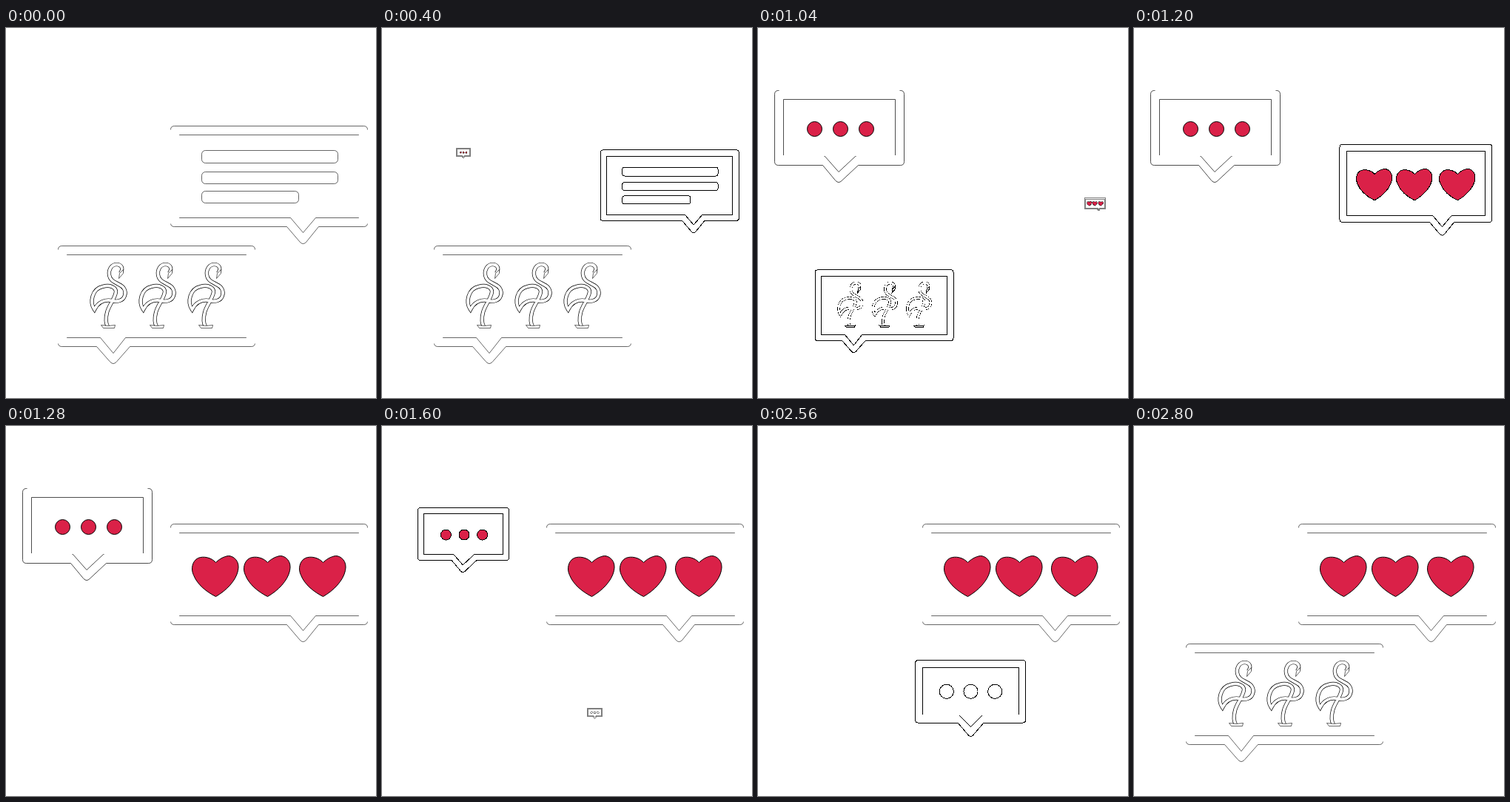
Animation, 500 px wide and 500 px high, one loop 3.2 s. Source, as an HTML page:

```html
<!DOCTYPE html>
<html lang="en">
<head>
<meta charset="utf-8">
<title>Chat bubbles</title>
<style>
  html, body { margin: 0; width: 100%; height: 100%; overflow: hidden; background: #fff; }
  svg { display: block; width: 100%; height: 100%; shape-rendering: crispEdges; }
  .still { shape-rendering: auto; }
  .line { fill: #fff; stroke: #000; vector-effect: non-scaling-stroke; }
  .red { fill: #da2148; stroke-width: 1; }
  .gap { fill: none; stroke: #fff; stroke-width: 3; }
  .tube { fill: none; stroke: #000; stroke-width: 5.2; }
  .tube.core { stroke: #fff; stroke-width: 3.8; }
</style>
</head>
<body>
<svg viewBox="0 0 500 500"><g id="stage" transform="translate(.5 .5)"></g></svg>
<script>
const TICK = 80, TICKS = 40;
const stage = document.getElementById('stage');

const path = (d, cls = 'line') => `<path class="${cls}" d="${d}"/>`;
const repeat = (offsets, art) =>
  offsets.map(x => `<g transform="translate(${x} 0)">${art}</g>`).join('');
const dots = (xs, y, r, cls) =>
  xs.map(x => `<circle class="${cls}" cx="${x}" cy="${y}" r="${r}"/>`).join('');
const bar = (y, w, h) =>
  `<rect class="line" x="264" y="${y}" width="${w}" height="${h}" rx="5"/>`;

// Speech bubble: rounded outer frame and square inner frame, both with a tail.
function frame({ l, t, r, b, tip, outer, inner, innerTip }) {
  const c = 5;
  return path(`M${l + c} ${t}H${r - c}Q${r} ${t} ${r} ${t + c}V${b - c}Q${r} ${b} ${r - c} ${b}
    H${outer[1]}L${tip + 4} ${b + 21}Q${tip} ${b + 25} ${tip - 4} ${b + 21}L${outer[0]} ${b}
    H${l + c}Q${l} ${b} ${l} ${b - c}V${t + c}Q${l} ${t} ${l + c} ${t}Z`) +
    path(`M${l + 12} ${t + 12}H${r - 12}V${b - 12}H${inner[1]}L${tip} ${innerTip}
    L${inner[0]} ${b - 12}H${l + 12}Z`);
}

// Frame edges that vanish while a bubble rests at full size.
const outerTop = ({ l, t, r }) => `M${l + 6} ${t}H${r - 6}`;
const innerBase = ({ l, r, b, inner }) =>
  `M${l + 10} ${b - 12}H${inner[0] - 1}M${inner[1] + 1} ${b - 12}H${r - 10}`;
const allSides = ({ l, t, r, b }) =>
  `M${l} ${t + 5}V${b - 4}M${r} ${t + 5}V${b - 4}` +
  `M${l + 12} ${t + 12.5}V${b - 12.5}M${r - 12} ${t + 12.5}V${b - 12.5}`;

const heart = path(`M283 184C277 177 266 175 259 178C251 182 249 193 253 201
  C258 214 271 224 283 230C297 222 310 209 313 195C316 182 307 175 300 175
  C293 176 287 180 283 184Z`, 'line red');

const bird = `M154 331C159 324 155 319 149 319C142 319 138 326 139 333
  C140 341 147 343 152 346C159 349 162 355 160 361C158 368 150 370 143 368
  C133 366 124 370 119 380C112 370 116 352 130 349C140 346 148 350 148 356
  C147 365 138 375 136 384C134 392 134 398 137 403`;
const flamingo = path(bird, 'tube') + path(bird, 'tube core') +
  path('M153 331L158 326L158 331L152 338Z') +
  path('M128 401Q138 403 147 401L146 405H131Z');

const wide = { l: 222, t: 132, r: 488, b: 268, tip: 401, outer: [379, 422], inner: [384, 418], innerTip: 276 };
const low = { l: 70, t: 294, r: 336, b: 430, tip: 144.5, outer: [122, 167], inner: [127, 161], innerTip: 439 };
const small = { l: 22, t: 84, r: 197, b: 185, tip: 108.5, outer: [87, 135], inner: [90, 131], innerTip: 194 };
const pale = { l: 193, t: 297, r: 380, b: 403, tip: 287, outer: [265, 309], inner: [268, 306], innerTip: 410 };

// start and life are in ticks; from and to are the scales at the first tick in and out.
const bubbles = [
  { box: wide, origin: [467, 241], start: 0, life: 5, from: 1, to: .703, weight: .6,
    gaps: allSides(wide), art: bar(165, 184, 17) + bar(194, 184, 16) + bar(220, 131, 16) },
  { box: wide, origin: [467, 241], start: 13, life: 27, from: .107, to: 0, weight: .6,
    gaps: allSides(wide), art: repeat([0, 70, 145], heart) },
  { box: small, origin: [109.5, 171.5], start: 5, life: 15, from: .107, to: .703, weight: .7,
    gaps: outerTop(small) + innerBase(small), art: dots([76, 111, 146], 136, 10, 'line red') },
  { box: low, origin: [92, 403], start: 32, life: 21, from: 0, to: .703, weight: .6,
    gaps: allSides(low), art: repeat([0, 66, 132], flamingo) },
  { box: pale, origin: [287, 391], start: 20, life: 12, from: .107, to: .797, weight: .9,
    gaps: allSides(pale) + outerTop(pale), always: innerBase(pale),
    art: dots([246, 287, 328], 350, 12, 'line') }
];

for (const bubble of bubbles) {
  const g = document.createElementNS('http://www.w3.org/2000/svg', 'g');
  g.innerHTML = frame(bubble.box) + path(bubble.always || '', 'gap') +
    path(bubble.gaps, 'gap rest') + bubble.art;
  stage.append(g);
  bubble.node = g;
  bubble.rest = g.querySelector('.rest');
}

function scaleAt({ start, life, from, to }, tick) {
  const age = (tick - start + TICKS) % TICKS;
  return age < life ? Math.min(1, from + age / 3) : to - (age - life) / 3;
}

function draw(now) {
  const tick = Math.floor(now / TICK) % TICKS;
  for (const bubble of bubbles) {
    const s = scaleAt(bubble, tick), [x, y] = bubble.origin;
    const { node, rest, weight } = bubble;
    const still = s === 1;
    node.style.display = s < .05 ? 'none' : '';
    node.style.strokeOpacity = s < .2 ? .5 : 1;
    node.style.strokeWidth = still ? weight : 1;
    node.classList.toggle('still', still);
    rest.style.display = still ? '' : 'none';
    if (s >= .05) node.setAttribute('transform', `translate(${x * (1 - s)} ${y * (1 - s)}) scale(${s})`);
  }
}

const begin = performance.now();
function loop() {
  draw(performance.now() - begin);
  requestAnimationFrame(loop);
}
loop();
</script>
</body>
</html>
```
